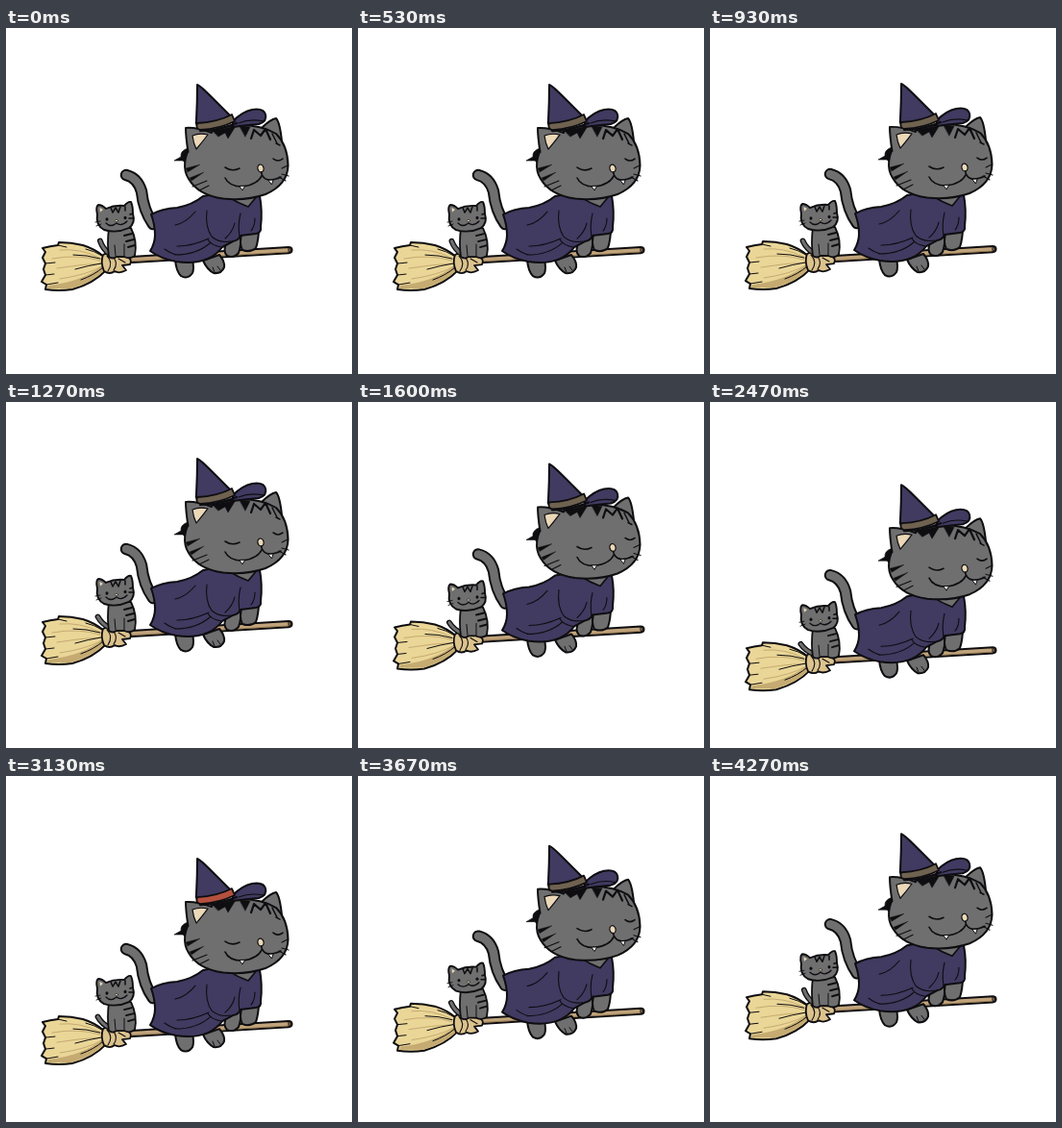
An HTML page with a canvas for the animation above (4340 ms loop, 360 by 360 pixels).

```html
<!DOCTYPE html>
<html lang="en">
<head>
<meta charset="utf-8">
<title>Cat on a broom</title>
<style>
html, body { margin: 0; width: 100%; height: 100%; overflow: hidden; background: #fff; }
canvas { display: block; width: 100vmin; height: 100vmin; }
</style>
</head>
<body>
<canvas id="stage"></canvas>
<script>
const LOOP = 4340, STEPS = 65;
const INK = '#0e0d10', FUR = '#6f6f6f', NAVY = '#413a61', STRAW = '#ead697',
  STRAW_SHADE = '#c5ab72', KNOT = '#dcc38d', WOOD = '#c1a47c', CREAM = '#ead8b8';

const canvas = document.getElementById('stage');
const g = canvas.getContext('2d');
const ratio = Math.max(1, window.devicePixelRatio || 1);
canvas.width = canvas.height = 360 * ratio;

// [time, height] pairs, joined by a periodic smooth curve
const BOB = [[0, 0], [530, 0], [900, -1], [1270, 0], [1600, 7], [1930, 15], [2130, 21.5],
  [2470, 28], [2800, 28], [3130, 26.5], [3400, 21], [3670, 11.5], [3930, 5], [4270, .5]];

function curve(keys, t) {
  const n = keys.length;
  const at = i => {
    const k = keys[(i + n) % n];
    return [k[0] + Math.floor(i / n) * LOOP, k[1]];
  };
  let i = n - 1;
  while (keys[i][0] > t) i--;
  const [a, b, c, d] = [at(i - 1), at(i), at(i + 1), at(i + 2)];
  const span = c[0] - b[0], u = (t - b[0]) / span;
  const m0 = (c[1] - a[1]) / (c[0] - a[0]) * span;
  const m1 = (d[1] - b[1]) / (d[0] - b[0]) * span;
  const u2 = u * u, u3 = u2 * u;
  return (2 * u3 - 3 * u2 + 1) * b[1] + (u3 - 2 * u2 + u) * m0
    + (3 * u2 - 2 * u3) * c[1] + (u3 - u2) * m1;
}

function paint(path, fill, width = 2, ink = INK) {
  if (fill) { g.fillStyle = fill; g.fill(path); }
  if (width) { g.lineWidth = width; g.strokeStyle = ink; g.stroke(path); }
}
const shape = (d, fill, width, ink) => paint(new Path2D(d), fill, width, ink);
const line = (d, width = 1.2, ink = INK) => shape(d, null, width, ink);

function oval(x, y, rx, ry, fill, width = 2, turn = 0) {
  const p = new Path2D();
  p.ellipse(x, y, rx, ry, turn, 0, Math.PI * 2);
  paint(p, fill, width);
}

function tube(d, width, fill, rim = 2) {
  line(d, width + rim * 2, INK);
  line(d, width, fill);
}

function broom() {
  shape('M122 238.5L294 228Q297.5 228 297.5 231Q297.5 234 294 234.2L123 244.5Z', WOOD, 2);
  line('M130 242.7L292 233', .9, '#94784f');
  oval(295, 231, 1.3, 2.3, '#8a6d4c', .8);
  shape('M102 238Q93 230 80 226Q68 223 55 223L54 226Q46 227 38 229L41 233L38 239L41 245L39 251' +
    'L41 257L37 264L42 267L41 272Q55 274 69 272Q91 266 104 252Z', STRAW, 2);
  shape('M44 268Q79 264 101 247L103 252Q88 266 68 271L43 271Z', STRAW_SHADE, 0);
  line('M97 239Q77 229 56 231M98 242Q75 235 48 240M99 245Q77 246 53 250M100 248Q84 257 56 261', 1, STRAW_SHADE);
  line('M100 237Q92 232 83 230M98 240Q84 236 70 236M99 245Q86 247 72 251M101 249Q92 257 78 262' +
    'M41 245L51 244M41 257L50 256M42 267L54 265M54 226L63 228', 1);
  shape('M101 236Q107 232 113 237L125 238Q132 240 129 246L121 247L125 252Q118 256 113 253' +
    'Q108 257 102 253Q98 244 101 236Z', KNOT, 1.8);
  line('M105 237Q112 244 106 253M112 239Q117 245 112 252M117 240L124 244', 1.1);
}

function kitten(swing) {
  g.save();
  g.translate(107, 235);
  g.rotate(swing);
  g.translate(-107, -235);
  tube('M108 235Q100 231 96 223', 3.2, FUR, 1.3);
  g.restore();

  shape('M107 208Q105 225 107 238Q111 241 115 238L123 238Q129 241 134 237Q137 222 130 208Z', FUR, 1.8);
  line('M113 226L114 237M123 225L123 237', 1);
  line('M131 214L123 216M133 220L125 222M134 226L127 228', 1.9);

  shape('M95 194Q93 186 96 184Q100 184 104 188Q113 184 123 185Q127 180 130 181Q132 185 132 193' +
    'Q135 203 128 208Q115 214 102 210Q93 205 95 194Z', FUR, 1.9);
  shape('M97.5 187L101 189L98 191.5Z', CREAM, 0);
  line('M109 187L111 192L114 187L117 192L119 186M124 186L124 190M129 194L132 193M128 198L132 198', 1.5);
  oval(105, 199, 1.5, 1.7, INK, 0);
  oval(124, 197.5, 1.5, 1.7, INK, 0);
  oval(115, 200.5, 1.5, 1.2, CREAM, .6);
  line('M104 203Q109 208 115 203Q120 207 126 201', 1.3);
  line('M93 202L98 201M94 206L99 204', .9);
}

function body() {
  tube('M125 153Q137 156 141 170Q143 190 153 204', 8.5, FUR, 2);
  shape('M176 241Q177 253 182 258Q189 262 194 255Q196 250 194 242Z', FUR, 2);
  shape('M205 242Q209 251 216 255Q224 256 227 249Q228 243 222 236Z', FUR, 2);
  line('M215 249L217 254M220 248L223 252', 1);

  // Front legs
  shape('M230 222Q225 232 230 237Q237 240 242 234Q245 226 244 216Z', FUR, 2);
  shape('M246 212Q242 224 246 231Q254 234 260 229Q263 220 263 208Z', FUR, 2);

  // Dress
  shape('M205 175Q194 184 178 187Q162 188 151 194Q155 205 155 215Q155 224 150 232Q161 240 177 243' +
    'Q196 246 210 240Q219 236 225 228L236 222Q242 221 244 216L260 214Q266 213 265 207' +
    'Q267 190 264 175Q235 168 205 175Z', NAVY, 2);
  line('M209 190Q207 207 214 217Q222 224 234 222M243 217Q241 205 244 193M197 191Q187 203 176 205' +
    'M212 224Q198 236 176 236M211 219Q194 227 178 227M224 228Q213 226 210 220M165 230Q172 235 178 236' +
    'M228 219Q236 212 238 203M255 211Q259 206 259 198', 1.1);
  shape('M232 176Q241 182 252 186L261 175Z', FUR, 1.6);
}

function head() {
  shape('M189 125Q181 128 182 134L175 138L184 138L189 143Z', INK, .6);
  shape('M266 104Q275 95 281 94Q285 98 287 118L280 123Z', FUR, 2);
  shape('M193 122C186 132 183 146 190 157Q200 174 226 177.5Q250 180 270 173Q293 163 293.5 143' +
    'Q293 122 281 110Q266 101 243 101Q212 103 193 122Z', FUR, 2);
  shape('M190 129Q187 113 187 104Q197 103 214 109L198 134Z', FUR, 0);
  line('M189.5 129Q187 113 187 104Q197 103 214 109', 2);
  shape('M194 112Q201 109 210 111Q204 119 198 126Q195 120 194 112Z', CREAM, 1.2);

  // Fur markings
  shape('M215 107L239 102L231 115L228 109L221 113Z', INK, .5);
  shape('M243 102L254 103L249 113Z', INK, .5);
  line('M255 115L258 106L265 112L270 105L275 116', 2.2);
  line('M277 110L282 120M285 122L281 120', 1.5);
  shape('M187 146L202 142L189 150Z', INK, .3);
  shape('M191 156L206 150L193 159Z', INK, .3);
  line('M194 165L209 159M201 169L211 164', 1.1);
  line('M287 146L293 143M287 152L294 154M284 155L291 159', 1.1);

  // Face
  line('M228 145Q235 150 243 146M278 136Q283 140 288 136', 1.6);
  oval(265, 146, 3.1, 4, CREAM, 1.2, -.25);
  line('M228 156Q232 165 246 165Q262 163 266.5 153Q271 162 286 155M265.5 150L266.5 153', 1.6);
  shape('M243 164.7L246 169L248.5 164.5Z', '#fff', 1);
  shape('M273 158.5L276.5 163L278 158.3Z', '#fff', 1);
}

function hat(band) {
  shape('M236 97Q246 87 256 85Q268 83 270 90Q272 97 263 100Q250 101 236 103Z', NAVY, 2);
  line('M242 99Q254 94 268 97', 1.1);
  shape('M199 59Q202 60 213 71L236 94Q219 105 199 102Q197 99 198 96Q199 77 199 59Z', NAVY, 2);
  shape('M199 99Q220 98 235 90L238 97Q222 105 202 106Q197 105 199 99Z', band, 1.8);
  line('M202 107Q219 107 240 99', 2.2);
}

function draw(t) {
  g.setTransform(ratio, 0, 0, ratio, 0, 0);
  g.fillStyle = '#fff';
  g.fillRect(0, 0, 360, 360);
  g.lineCap = g.lineJoin = 'round';
  g.translate(0, curve(BOB, t));
  broom();
  kitten(.15 * Math.cos(t / LOOP * Math.PI * 2));
  body();
  head();
  hat(t > 3050 && t < 3250 ? '#b5503f' : '#6f6250');
}

let start = null;
function tick(now) {
  if (start === null) start = now;
  const step = Math.floor(((now - start) % LOOP) / LOOP * STEPS);
  draw(step * LOOP / STEPS);
  requestAnimationFrame(tick);
}
draw(0);
requestAnimationFrame(tick);
</script>
</body>
</html>
```
